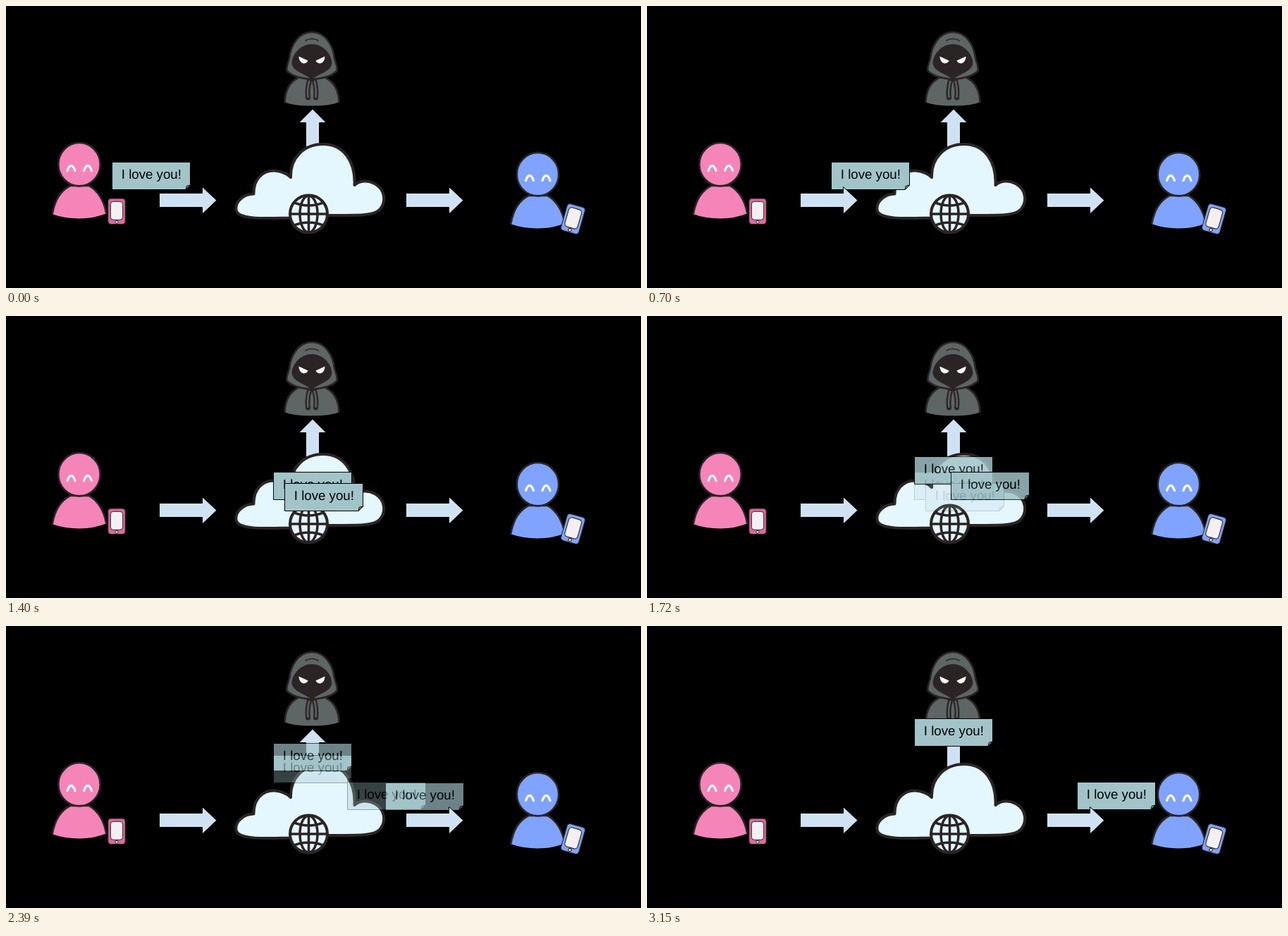
An HTML page for the animation above (3350 ms loop, 901 px wide and 400 px high).

```html
<!DOCTYPE html>
<html lang="en">
<head>
<meta charset="utf-8">
<title>Message interception</title>
<style>
  html, body { margin: 0; width: 100%; height: 100%; overflow: hidden; background: #000; }
  svg { display: block; }
  text { font: 18.67px "Liberation Sans", Arial, sans-serif; text-rendering: geometricPrecision; }
  .ink { stroke: #2b2425; stroke-width: 2.6; stroke-linejoin: round; stroke-linecap: round; }
  .line { fill: none; }
  .smile { fill: none; stroke: #fff; stroke-width: 3.2; stroke-linecap: round; stroke-linejoin: round; }
  .arrow { fill: #cfe2f3; stroke: #000; }
  .note { stroke: #000; stroke-linejoin: round; }
</style>
</head>
<body>
<svg width="901" height="400" viewBox="0 0 901 400">
  <defs>
    <path id="eye" class="smile" d="M-5.500 3.700Q-3 -3.700 0 -3.700T5.500 3.700"/>
    <g id="person">
      <path d="M65 295C69 277 77 262 91 255H118C131 262 139 277 143 294Q125 301.500 104 301.500T65 295Z"/>
      <path class="ink line" d="M66 294C69 277 77 262 91 255H118C131 262 139 277 142 293"/>
      <ellipse class="ink" cx="104" cy="224.700" rx="29.700" ry="30.700"/>
      <use href="#eye" x="92.500" y="230"/>
      <use href="#eye" x="116" y="230"/>
    </g>
    <g id="phone">
      <rect class="ink" style="stroke-width:1" x="-12.200" y="-18.200" width="24.400" height="36.400" rx="4"/>
      <rect x="-8.700" y="-14" width="17.400" height="26" rx="4" fill="#f4f0f2" stroke="#2b2425"/>
      <circle cy="15" r="2" fill="#f4f0f2" stroke="#2b2425"/>
    </g>
    <path id="right" class="arrow" d="M217.500 265.500H278.500V256.500L298.900 275.700L278.500 295V285.500H217.500Z"/>
    <g id="arrows">
      <use href="#right"/>
      <use href="#right" x="350"/>
    </g>
    <g id="note" class="note">
      <path fill="#a2c4c9" d="M0 0H111V32.500L104.500 39H0Z"/>
      <path fill="#829da1" d="M104.500 39L105.800 33.800L111 32.500Z"/>
      <text x="13.300" y="23.500" stroke="none">I love you!</text>
    </g>
    <!-- left half, mirrored about x = 0 -->
    <g id="hood">
      <path d="M0 102H-20C-33 109 -38 122 -39 136Q-28 141.500 0 141.500Z"/>
      <path class="ink line" d="M-20 102C-33 109 -38 122 -38.500 136"/>
      <path class="ink line" style="stroke-width:7" d="M-3.500 106Q-7 118 -5.500 130"/>
      <path class="line" stroke="#5d6565" stroke-width="2.400" d="M-3.500 106Q-7 118 -5.500 130"/>
      <path d="M0 37C-19 37 -30 56 -32 74C-34 82 -37 87 -35.500 92Q-26 102 0 104Z"/>
      <path class="ink line" d="M0 37C-19 37 -30 56 -32 74C-34 82 -37 87 -35.500 92Q-26 102 0 104"/>
      <path fill="#2b2425" d="M.3 54C-17 54 -29 70 -28.500 82C-25 95 -8 96 .3 105Z"/>
      <path class="ink line" style="stroke-width:1.500" d="M0 46.500Q-5 46.500 -9 49"/>
      <path fill="#fff" d="M-18.500 71.500L-5.500 77.500C-7 83 -18 84 -18.500 71.500Z"/>
    </g>
    <g id="back">
      <rect width="901" height="400"/>
      <g fill="#f584b9"><use href="#person"/></g>
      <g fill="#e0689f"><use href="#phone" x="157" y="291.300"/></g>
      <g fill="#80a3ff">
        <use href="#person" x="650.500" y="14"/>
        <use href="#phone" transform="translate(804.500 302) rotate(16) scale(1.080)"/>
      </g>
      <g fill="#5d6565">
        <use href="#hood" x="434"/>
        <use href="#hood" transform="translate(434) scale(-1 1)"/>
      </g>
      <path class="arrow" d="M435 146.200L454.300 165.500H444.500V205H425.500V165.500H415.700Z"/>
      <g class="ink" fill="#e4f7ff" style="stroke-width:4">
        <path d="M326.500 289C325 277 338 266.500 351.500 266.500C351 247 363 233 381 233.500Q396 235 404 243C403 215 423 196 450 196C480 196 496 222 494.500 254C502 247 514 247 523 252C538 260 540 278 530 289C521 298 500 297 459 297L402 300.500C372 301 328 304 326.500 289Z"/>
        <circle cx="429.500" cy="295" r="26.500"/>
        <g class="line" style="stroke-width:3.500">
          <path d="M429.500 269V321M403 295H456M409 279Q429.500 287 450 279M409 311Q429.500 303 450 311"/>
          <ellipse cx="429.500" cy="295" rx="12.500" ry="26"/>
        </g>
      </g>
    </g>
  </defs>
  <g id="stage"></g>
</svg>
<script>
  const HOLD = 200, FADE = 150, STEP = 30, SLOT = HOLD + FADE, LOOP = 3350, SLIDES = 10;

  // Key points: [slide, x, y]; slides between them lie on a straight line
  const toCloud = [[0, 151, 222], [2, 262, 222], [4, 380, 222]];
  const toSpy = [[5, 380, 200], [7, 380, 167], [8, 380, 147], [9, 380, 132]];
  const toFriend = [[4, 396, 238], [5, 432, 222], [8, 592, 223], [9, 611, 222]];
  const paths = [[...toCloud, ...toSpy], toFriend];

  function noteAt(path, slide) {
    const next = path.findIndex(key => key[0] >= slide);
    const b = path[next], a = path[next - 1] || b;
    if (slide < a[0]) return "";
    const mix = a === b ? 0 : (slide - a[0]) / (b[0] - a[0]);
    const [x, y] = [1, 2].map(i => Math.round(a[i] + (b[i] - a[i]) * mix) - 0.5);
    return `<use href="#note" x="${x}" y="${y}"/>`;
  }

  const stage = document.getElementById("stage");
  for (let i = 0; i < SLIDES; i++) {
    const notes = paths.map(path => noteAt(path, i)).join("");
    stage.innerHTML += `<g><use href="#back"/>${notes}<use href="#arrows"/></g>`;
  }
  const layers = [...stage.children];

  function draw(now) {
    const t = now % LOOP, current = Math.floor(t / SLOT), phase = t % SLOT;
    const mix = phase < HOLD ? 0 : (Math.floor((phase - HOLD) / STEP) + 1) * STEP / (FADE + STEP);
    layers.forEach((layer, i) => {
      const alpha = i === current ? 1 : i === current + 1 ? mix : 0;
      layer.style.display = alpha ? "" : "none";
      layer.style.opacity = alpha;
    });
  }

  const start = performance.now();
  function tick() {
    draw(performance.now() - start);
    requestAnimationFrame(tick);
  }
  tick();
</script>
</body>
</html>
```
